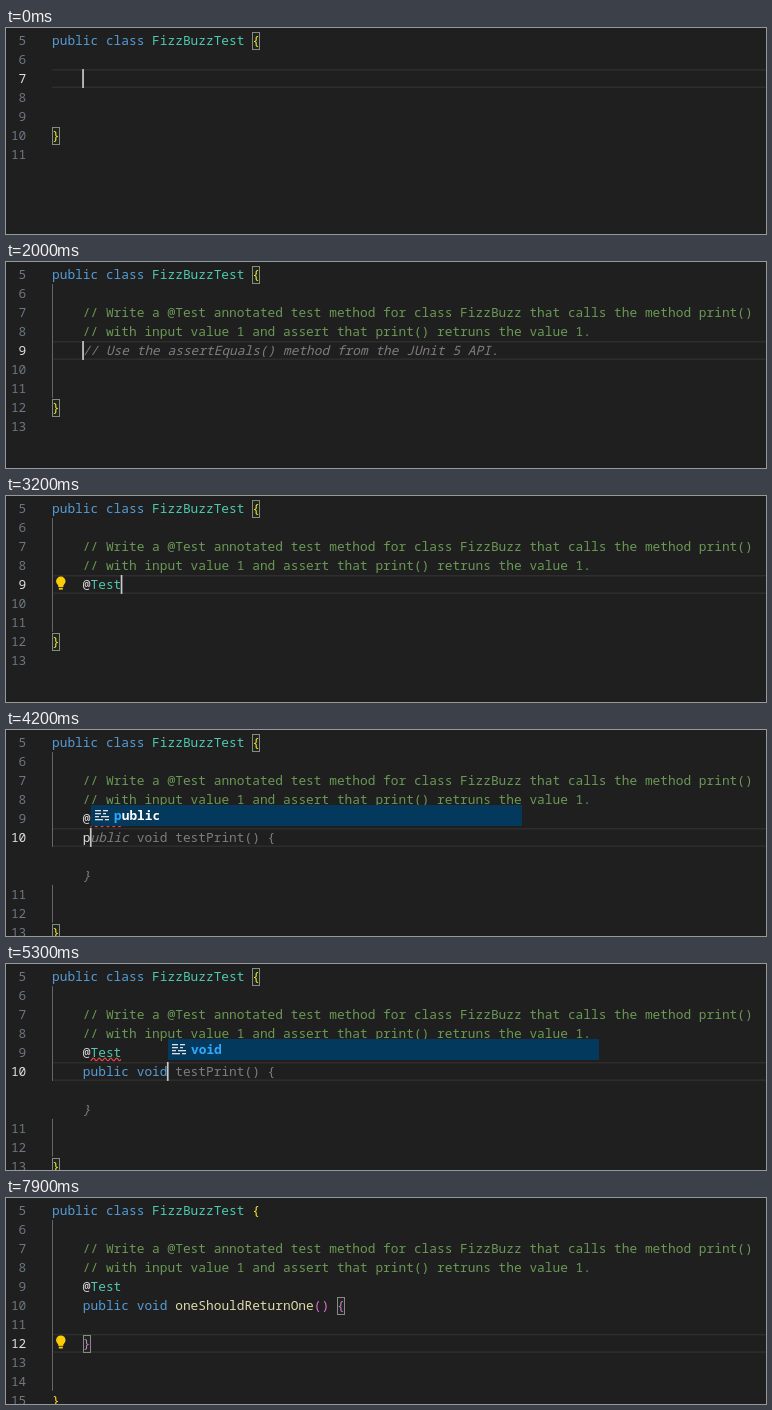
An HTML page with a canvas that plays this animation: 760x206 px, repeating every 8 s.

```html
<!DOCTYPE html>
<html lang="en">
<head>
<meta charset="utf-8">
<title>Editor</title>
<style>
html, body { margin: 0; width: 100%; height: 100%; overflow: hidden; background: #1f1f1f; }
canvas { display: block; width: 760px; height: 206px; }
</style>
</head>
<body>
<canvas id="stage"></canvas>
<script>
const W = 760, H = 206, LOOP = 8000;
const CW = 7.7, LH = 18.95, TOP = 3.2, LEFT = 46, INDENT = 4, FIRST = 5;
const FONT = '12.833px "Noto Sans Mono", "DejaVu Sans Mono", monospace';
const C = {
  bg: '#1f1f1f', plain: '#e0e0e0', key: '#569cd6', type: '#4ec9b0', fn: '#dcdcaa',
  comment: '#6a9955', ghost: '#7d7d7d', num: '#6e7681', numOn: '#e0e0e0',
  gold: '#ffdf28', pink: '#da70d6', guide: '#666666', edge: '#2e2e2e'
};

const canvas = document.getElementById('stage');
const dpr = window.devicePixelRatio || 1;
canvas.width = W * dpr;
canvas.height = H * dpr;
const g = canvas.getContext('2d');
g.scale(dpr, dpr);

const note1 = '// Write a @Test annotated test method for class FizzBuzz that calls the method print()';
const note2 = '// with input value 1 and assert that print() retruns the value 1.';
const hint = '// Use the assertEquals() method from the JUnit 5 API.';
const draft = 'public void testPrint() {';
const method = 'public void oneShouldReturnOne() {';

// Each edit: time, finished lines, line being typed
const notes = [note1, note2];
const tested = [...notes, '@Test'];
const edits = [
  [-200, [], ''],
  [1200, [note1], ''],
  [1700, notes, '']
];
const type = (done, base, list) => list.forEach(([t, s]) => edits.push([t, done, base + s]));
type(notes, '@', [[2400, ''], [2500, 'T'], [2600, 'Te'], [2700, 'Tes'], [2900, 'Test']]);
type(tested, '', [[3400, ''], [4100, 'p'], [4400, 'pu'], [4600, 'pub'], [4700, 'publ'], [4800, 'publi'], [4900, 'public']]);
type(tested, 'public ', [[5000, ''], [5100, 'v'], [5200, 'vo'], [5300, 'void'], [5500, 'void ']]);
type(tested, 'public void ', [[5900, 'o'], [6000, 'on'], [6100, 'one']]);
type(tested, 'public void one', [[6300, 'S'], [6400, 'Sh'], [6500, 'Sho'], [6600, 'Shoul'], [6700, 'Should']]);
edits.push([7400, [...tested, method, ''], '}']);

const between = (t, a, b) => t >= a && t < b;
const rowTop = r => TOP + r * LH;
const colX = c => LEFT + c * CW;

function put(s, x, row, color, style = '') {
  g.font = style + ' ' + FONT;
  g.fillStyle = color;
  g.fillText(s, x, rowTop(row) + 14);
}

function tint(word, inner) {
  if (/^(public|class|void)$/.test(word)) return C.key;
  if (/^(FizzBuzzTest|Test)$/.test(word)) return C.type;
  if (word === 'oneShouldReturnOne') return C.fn;
  if (/^[(){}]$/.test(word)) return inner ? C.pink : C.gold;
  return C.plain;
}

function code(s, col, row, color, style) {
  const parts = color ? /\S+/g : /\w+|[^\w\s]/g;
  for (const m of s.matchAll(parts))
    put(m[0], colX(col + m.index), row, color || tint(m[0], col > 0), style);
}

function bracketBox(col, row) {
  const x = Math.round(colX(col)), y = Math.round(rowTop(row)) + 1;
  g.fillStyle = 'rgba(0,100,0,0.12)';
  g.fillRect(x, y, 8, 18);
  g.strokeStyle = '#888888';
  g.lineWidth = 1;
  g.strokeRect(x + 0.5, y + 0.5, 7, 17);
}

function bulb(row) {
  const x = 54.8, y = rowTop(row);
  g.fillStyle = '#ffcc00';
  g.beginPath();
  g.arc(x, y + 6.3, 4.7, 0, Math.PI * 2);
  g.fill();
  g.fillRect(x - 2.6, y + 9, 5.2, 3);
  g.fillRect(x - 2, y + 12.8, 4, 1.8);
}

function squiggle(col, len, row) {
  const y = rowTop(row) + 16.4;
  g.strokeStyle = '#f14c4c';
  g.lineWidth = 1.1;
  g.beginPath();
  for (let x = 0; x <= len * CW; x += 0.5)
    g.lineTo(colX(col) + x, y + 1.3 * Math.cos(x * Math.PI / 2.9));
  g.stroke();
}

function popup(x, y, word, hit) {
  g.fillStyle = '#04395e';
  g.fillRect(x, y, 431, 21);
  g.fillStyle = '#e0e0e0';
  [[4, 5, 6], [12, 5, 5], [4, 8, 6], [12, 8, 3], [4, 11, 4], [10, 11, 8], [4, 14, 8], [14, 14, 4]]
    .forEach(([dx, dy, w]) => g.fillRect(x + dx, y + dy, w, 1.3));
  g.font = 'bold ' + FONT;
  g.fillStyle = '#2aaaff';
  g.fillText(word.slice(0, hit), x + 23, y + 15);
  g.fillStyle = '#ffffff';
  g.fillText(word.slice(hit), x + 23 + hit * CW, y + 15);
}

function draw(t) {
  const [since, done, typed] = edits.filter(e => e[0] <= t).pop();
  const closed = typed === '}';
  const body = [...done, typed];
  const lines = ['public class FizzBuzzTest {', '', ...body, '', '', '}', ''];
  const active = body.length + 1;
  const last = lines.length - 2;
  const word = between(t, 4200, 5000) ? 'public' : between(t, 5100, 5500) ? 'void' : '';

  let ghost = '';
  if (between(t, 2000, 2400)) ghost = hint;
  else if (between(t, 3700, 5900)) ghost = draft.slice(typed.length);
  else if (between(t, 6100, 7400)) ghost = method.slice(typed.length);
  const zone = ghost && t > 3000 ? 2 : 0;
  const rowOf = i => i > active ? i + zone : i;

  g.fillStyle = C.bg;
  g.fillRect(0, 0, W, H);

  g.fillStyle = C.edge;
  g.fillRect(LEFT, rowTop(active), W - LEFT, 1.5);
  g.fillRect(LEFT, rowTop(active + 1) - 1.5, W - LEFT, 1.5);

  g.fillStyle = C.guide;
  g.globalAlpha = Math.min(1, t / 500);
  g.fillRect(LEFT, rowTop(1), 1, rowTop(active + 1) - rowTop(1));
  g.fillRect(LEFT, rowTop(active + 1 + zone), 1, rowTop(rowOf(last)) - rowTop(active + 1 + zone));
  g.globalAlpha = 1;

  if (closed) {
    bracketBox(INDENT + method.length - 1, active - 2);
    bracketBox(INDENT, active);
  } else {
    bracketBox(26, 0);
    bracketBox(0, rowOf(last));
  }

  lines.forEach((s, i) => {
    const row = rowOf(i), n = String(i + FIRST);
    put(n, 20.3 - n.length * CW, row, i === active ? C.numOn : C.num);
    const inside = i > 0 && i < last;
    code(s, inside ? INDENT : 0, row, s.startsWith('//') ? C.comment : '');
  });

  const end = INDENT + typed.length;
  const hit = typed.split(' ').pop().length;
  if (ghost) {
    // With the popup open only the rest of the suggested word is slanted
    const slant = word ? word.length - hit : ghost.length;
    code(ghost.slice(0, slant), end, active, C.ghost, 'italic');
    code(ghost.slice(slant), end + slant, active, C.ghost);
    if (zone) code('}', INDENT, active + 2, C.ghost, 'italic');
  }

  if (between(t, 3900, 7900)) squiggle(INDENT + 1, 4, 4);

  if (between(t, 3200, 3400)) bulb(4);
  if (between(t, 6900, 7700)) bulb(5);
  if (t >= 7700) bulb(7);

  if (word) popup(Math.round(colX(end)), Math.round(rowTop(active)) - 23, word, hit);

  if (Math.floor((t - since) / 500) % 2 === 0) {
    g.fillStyle = '#c8c8c8';
    g.fillRect(colX(end) - 0.6, rowTop(active), 1.7, LH);
  }
}

const start = performance.now();
function tick() {
  draw((performance.now() - start) % LOOP);
  requestAnimationFrame(tick);
}
tick();
</script>
</body>
</html>
```
